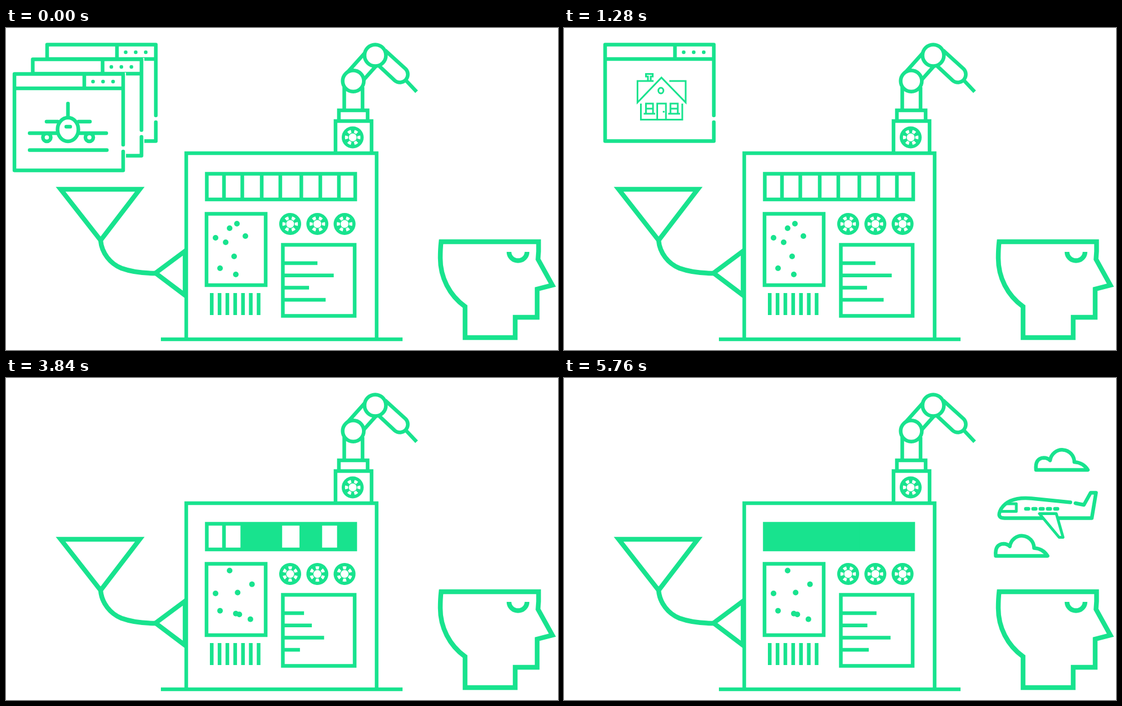
Recreate the animation shown at these times as an HTML page. Size 980 by 571 pixels, loop 6.72 s.

```html
<!DOCTYPE html>
<html lang="en">
<head>
<meta charset="utf-8">
<title>Thinking machine</title>
<style>
html, body { margin: 0; width: 100%; height: 100%; overflow: hidden; background: #fff; }
svg { display: block; width: 980px; height: 571px; }
.ink { fill: none; stroke: #18e38e; stroke-width: 6.5; }
.round { stroke-linecap: round; stroke-linejoin: round; }
.paper { fill: #fff; }
.solid { fill: #18e38e; stroke: none; }
.blank { fill: #fff; stroke: none; }
.off { display: none; }
</style>
</head>
<body>
<svg viewBox="0 0 980 571">
<defs>
  <g id="frame" class="round">
    <rect class="blank" x="1" y="1" width="200" height="177"/>
    <path d="M196 129V3.5H3V174.5H196V141M3 29H196M127 3.5V29"/>
    <path d="M142.5 17H179" stroke-dasharray="0 17.8"/>
  </g>
  <g id="jet" class="round">
    <path d="M98 56V79M60 88H80M117 88H137M30 108.5H78M118 108.5H166M30 138.5H167"/>
    <circle class="paper" cx="60.5" cy="116" r="7"/><circle class="paper" cx="136" cy="116" r="7"/>
    <ellipse class="paper" cx="98" cy="102" rx="18.5" ry="21"/>
    <path d="M95 97H102"/>
  </g>
  <g id="car" class="round" stroke-width="2.8">
    <path d="M146 207L151 193.5Q152 191.5 154 191.5H189Q191 191.5 192 193.5L198 207"/>
    <path d="M147 206H181M184 206H186M189 206H197M146 208Q141 211 141 217V232H203V217Q203 211 198 208"/>
    <ellipse cx="141.5" cy="203" rx="3.5" ry="2.5"/><ellipse cx="202" cy="203" rx="3.5" ry="2.5"/>
    <circle cx="150" cy="216" r="3.3"/><circle cx="194" cy="216" r="3.3"/>
    <circle cx="149.5" cy="225" r="1"/><circle cx="194.5" cy="225" r="1"/>
    <rect x="156.5" y="213.5" width="31" height="6.5" rx="2"/>
    <path d="M158 216.8H186M156 231V225H188V231M160 228H184"/>
    <path d="M141.5 232V238H147V232M197 232V238H202.5V232"/>
  </g>
  <g id="house" stroke-width="3">
    <path d="M159 94H130.5V132L173 88L216 132V94H187M149 94V86H145.5V81.5H157.5V86H154V94"/>
    <ellipse cx="172" cy="111" rx="4.5" ry="5"/>
    <path d="M136.5 134V162.5H210V134M165.5 162V134H181V162M177 147V150"/>
    <path d="M145.5 152V134H158V152M145.5 143H158M141.5 152H162M189 152V134H202V152M189 143H202M185 152H206"/>
  </g>
  <g id="fan">
    <circle class="solid" r="19.5"/><circle class="blank" r="7"/>
    <circle r="11" stroke="#fff" stroke-width="5.5" pathLength="6" stroke-dasharray=".5" stroke-dashoffset=".25"/>
  </g>
  <path id="cloud" class="round" d="M838 163Q836 142 852 141.5Q858 141.5 863 146A21.6 21.6 0 0 1 906 149Q922 150 930 163Z"/>
</defs>
<g class="ink">
  <!-- machine -->
  <path d="M320 552V222H658V552M275 552H704"/>
  <rect x="356.5" y="258.5" width="263.5" height="45.5"/>
  <rect x="356" y="329.5" width="105" height="126.5"/>
  <rect x="491.5" y="384.5" width="127.5" height="126"/>
  <path d="M362 489.5H453" stroke-width="39" stroke-dasharray="6.5 7.37"/>
  <path id="dividers"/>
  <g id="cells" class="solid"></g>
  <g id="dots" class="solid"></g>
  <path id="bars"/>
  <g id="fans"></g>
  <!-- arm -->
  <path d="M585 222V165H649V222M591 165V146H642V165M600.5 146V105M633 146V105"/>
  <path d="M605 80L640 41M634 93L660 64"/>
  <path d="M673 39.5L709.5 72.5A14.2 14.2 0 0 1 690.5 93.5L661 66M711 94L729 113"/>
  <circle class="paper" cx="616.5" cy="94" r="18.8"/>
  <circle class="paper" cx="655.5" cy="48.5" r="19"/>
  <use href="#fan" x="615.5" y="194"/>
  <!-- funnel and head -->
  <g stroke-width="8.4">
    <path d="M97 286H237.5L168 376.5Z"/>
    <path id="pipe" d="M168 377C170 399 185 418 205 426Q230 435 266 435"/>
    <path d="M265.5 434.5L318 395.5V474Z"/>
    <path d="M815 549V494C787 474 771 442 771 408Q771 392 772.5 379H945.5V396L944.5 410L970 456L943 463V513H904V549Z"/>
    <path d="M893 397A16 15.5 0 0 0 925 397"/>
  </g>
  <!-- moving parts -->
  <g id="pages"></g>
  <circle id="ball" class="paper" r="10"/>
  <use id="home" href="#house" transform="translate(769 155) scale(1.9) translate(-129 -80)"/>
  <g id="sky" class="round">
    <use href="#cloud"/><use href="#cloud" x="-71.5" y="152.5"/>
    <path d="M899 220.5L830 213.5Q790 210 776 232Q767 248.5 782 248.5H937L944.5 203.5H935L923 225L908 222"/>
    <path stroke-width="5" d="M785 223H803V236.5H774"/>
    <path d="M820 232H877" stroke-dasharray="4.5 8.4"/>
    <path class="paper" stroke-width="5" d="M844 240.5H874L886 282.5H879Z"/>
  </g>
</g>
</svg>
<script>
const STEP = 320, STEPS = 21, BALL = 6, WORK = 10, HOME = 17;
const $ = id => document.getElementById(id);
const { sin, cos, min, max, floor } = Math;
const show = (node, on) => node.classList.toggle('off', !on);
const repeat = (n, make) => Array.from({ length: n }, (_, i) => make(i)).join('');

// Each page waits in the stack, then shrinks above the funnel.
const pages = [
  { big: [12, 78], small: [111, 152], art: '<use href="#jet"/>' },
  { big: [44.5, 52], small: [111, 153], art: '<use href="#car" transform="scale(1.667) translate(-111 -153)"/>' },
  { big: [70, 26], small: [108, 146], art: '<use href="#house" transform="translate(-70 -26)"/>' }
];
$('pages').innerHTML = pages.map(p => `<g><use href="#frame"/>${p.art}</g>`).reverse().join('');
const pageNodes = [...$('pages').children].reverse();

function drawPage({ big, small }, i, step) {
  const node = pageNodes[i], drop = 2 * i + 1;
  show(node, step <= drop);
  node.setAttribute('transform', step < drop ? `translate(${big})` : `translate(${small}) scale(.6)`);
  if (step === drop) $('pages').append(node);
  else if (step === 0) $('pages').prepend(node);
}

const edges = [356, 387, 419.5, 454, 487, 524.3, 558, 591, 620];
$('dividers').setAttribute('d', edges.slice(1, -1).map(x => `M${x} 259V304`).join(''));
const lit = ['', '03', '0357', '2357', '03', '0357', '0357', '01234567'];
const seeds = [[397, 355], [372, 372], [410, 347], [390, 380], [405, 405], [425, 369], [408, 437], [380, 426]];

// Three working poses repeat twice between rest (0) and done (4).
function drawMachine(turn) {
  const pose = turn === 0 ? 0 : turn > 6 ? 4 : (turn - 1) % 3 + 1;

  $('cells').innerHTML = [...lit[turn]].map(i =>
    `<rect x="${edges[i]}" y="258" width="${edges[+i + 1] - edges[i]}" height="46"/>`).join('');

  $('dots').innerHTML = seeds.map(([x, y], i) => {
    const dx = 30 * max(0, cos(.9 * (i - 3.7))) * min(pose, 1);
    const dy = (10 + 30 * sin(.9 * (i - 1))) * min(pose, 3) / 3;
    return `<circle cx="${x + dx}" cy="${y + dy}" r="5"/>`;
  }).join('');

  $('bars').setAttribute('d', repeat(4, i => {
    const length = 66 + 15 * sin(1.5 * pose) + 24 * sin(2.3 * i - .3 - .7 * pose);
    return `M494 ${417 + 21.7 * i}h${length}`;
  }));

  $('fans').innerHTML = repeat(3, i =>
    `<use href="#fan" transform="translate(${504.5 + 48.3 * i} 347.5) rotate(${pose % 4 * 10})"/>`);
}

function drawBall(k) {
  const on = k >= 0 && k < WORK - BALL;
  show($('ball'), on);
  if (!on) return;
  const { x, y } = $('pipe').getPointAtLength(7 + 34 * k);
  $('ball').setAttribute('transform', `translate(${x} ${y})`);
}

function draw(step) {
  // Rear pages first, so the stack is rebuilt in order.
  for (let i = pages.length - 1; i >= 0; i--) drawPage(pages[i], i, step);
  if (step === 0) pageNodes.forEach(node => $('pages').prepend(node));
  drawBall(step - BALL);
  drawMachine(min(max(step - WORK + 1, 0), 7));
  show($('home'), step === HOME);
  show($('sky'), step > HOME);
}

let last = -1;
const start = performance.now();
function tick() {
  const step = floor((performance.now() - start) / STEP) % STEPS;
  if (step !== last) draw(last = step);
  requestAnimationFrame(tick);
}
tick();
</script>
</body>
</html>
```
